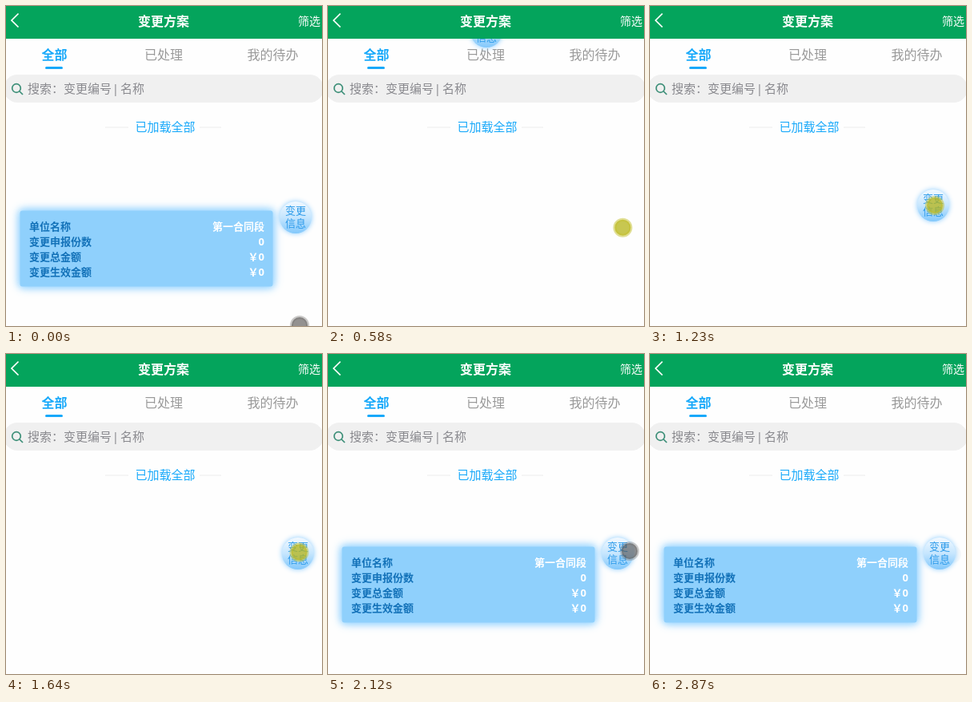
An HTML page that plays this animation: 395 by 401 pixels, repeating every 3370 ms.

```html
<!DOCTYPE html>
<html lang="zh-CN">
<head>
<meta charset="utf-8">
<style>
  html, body { margin: 0; width: 100%; height: 100%; overflow: hidden; background: #fefefe; }
  svg { display: block; width: 395px; height: 401px; font-family: "Noto Sans", "Noto Sans CJK SC", "Noto Sans CJK", sans-serif; }
  .mid { text-anchor: middle; }
  .end { text-anchor: end; }
  .bold { font-weight: 700; }
  #panel rect { fill: #8fd0fc; filter: drop-shadow(0 0 5px #9bd6ff) drop-shadow(0 0 5px #9bd6ff); }
  #ball circle { filter: drop-shadow(0 0 3px #8accff); }
  #pointer { fill: #4b4846; stroke: #6b6865; fill-opacity: .6; stroke-opacity: .35; }
  #pointer.pressed { fill: #b6b416; stroke: #c4c02c; fill-opacity: .75; stroke-opacity: .5; }
</style>
</head>
<body>
<svg viewBox="0 0 395 401">
  <defs>
    <linearGradient id="bubble" x2="0" y2="1">
      <stop offset="0" stop-color="#f2f9ff"/>
      <stop offset=".5" stop-color="#c6e6fe"/>
      <stop offset="1" stop-color="#82c8fb"/>
    </linearGradient>
  </defs>

  <g font-size="16" fill="#999">
    <text class="mid bold" x="60.5" y="67" fill="#18a9fa">全部</text>
    <rect x="49" y="76" width="22" height="3" rx="1.5" fill="#18a9fa"/>
    <text class="mid" x="197" y="67">已处理</text>
    <text class="mid" x="333.5" y="67">我的待办</text>
  </g>

  <rect x="-3" y="86" width="400" height="35" rx="17.5" fill="#f0f0f0"/>
  <g fill="none" stroke="#3d8f78" stroke-width="1.7">
    <circle cx="13" cy="103" r="5.3"/>
    <path d="M17 107l4 4"/>
  </g>
  <g font-size="15" fill="#89898e">
    <text x="27" y="109">搜索：变更编号</text>
    <text class="mid" x="137" y="109">|</text>
    <text x="143" y="109">名称</text>
  </g>

  <path d="M124 152h29M242 152h27" stroke="#ececec"/>
  <text class="mid" x="199" y="157" font-size="15" fill="#18a9fa">已加载全部</text>

  <g id="panel" font-size="13" class="bold" fill="#1271b8">
    <rect x="17.5" y=".5" width="316" height="95" rx="3"/>
  </g>

  <circle id="trace" cx="198" cy="32" r="20" fill="#fff" stroke="#f0f4f8" stroke-width="2"/>
  <circle id="smudge" cx="378" cy="251" r="11" fill="#f7f9fa"/>
  <g id="ball" class="mid" font-size="13" fill="#2d9bea">
    <circle r="20" fill="url(#bubble)"/>
    <text y="-4">变更</text>
    <text y="12">信息</text>
  </g>
  <circle id="pointer" r="10" stroke-width="4"/>

  <rect width="395" height="41" fill="#04a45c"/>
  <g fill="#fff">
    <path d="M15.500 9.500L7 18l8.500 8.500" fill="none" stroke="#fff" stroke-width="1.7"/>
    <text class="mid bold" x="197" y="25" font-size="16">变更方案</text>
    <text x="365" y="24" font-size="14" font-weight="500">筛选</text>
  </g>
</svg>
<script>
const LOOP = 3370, STEP = 81.7;
const GRAB = 7, RELEASE = 24, REOPEN = 26, LEAVE = 30;
const $ = id => document.getElementById(id);
const panel = $("panel"), ball = $("ball"), pointer = $("pointer");

function addRow(label, value, row) {
  const y = 25 + row * 19;
  panel.insertAdjacentHTML("beforeend",
    `<text x="29" y="${y}">${label}</text><text class="end" x="323" y="${y}" fill="#fff">${value}</text>`);
}
addRow("单位名称", "第一合同段", 0);
addRow("变更申报份数", "0", 1);
addRow("变更总金额", "￥0", 2);
addRow("变更生效金额", "￥0", 3);

// Eased 0 to 1 between two steps.
function ramp(n, from, to) {
  const p = Math.min(1, Math.max(0, (n - from) / (to - from)));
  return p * p * (3 - 2 * p);
}

const pointerX = n => 367 + 2 * ramp(n, 0, 6) - 13 * ramp(n, 6, 14) + 21 * ramp(n, 16, RELEASE);

// Rise to the ball, drag it down, up and level, then leave at the bottom.
const pointerY = n => 400 - 134 * ramp(n, 0, 6)
  + 45 * ramp(n, 6, 9) - 85 * ramp(n, 9, 14) + 24 * ramp(n, 14, 14.6)
  - 3 * ramp(n, 16, RELEASE) + 4 * ramp(n, 29, LEAVE) + 174 * ramp(n, LEAVE, 35);

function ballAt(n) {
  if (n < GRAB) return [362, 265];
  if (n === GRAB) return [198, 32];
  if (n >= RELEASE) return [362, 250];
  return [354 + 18 * ramp(n, 16, 23), n < 15 ? pointerY(n - .4) : 250];
}

const show = (node, on) => node.setAttribute("visibility", on ? "visible" : "hidden");
const move = (node, x, y) => node.setAttribute("transform", `translate(${x} ${y})`);

function draw(now) {
  const n = Math.floor((now % LOOP + 5) / STEP);
  const [x, y] = ballAt(n);
  move(ball, x, y);
  move(panel, 0, y - 9);
  move(pointer, pointerX(n), pointerY(n));
  show(panel, n < GRAB || n >= REOPEN);
  show($("trace"), n > GRAB && n < 12);
  show($("smudge"), n > LEAVE);
  pointer.classList.toggle("pressed", n >= GRAB - 1 && n < REOPEN);
}

const start = performance.now();
function tick() {
  draw(performance.now() - start);
  requestAnimationFrame(tick);
}
tick();
</script>
</body>
</html>
```
